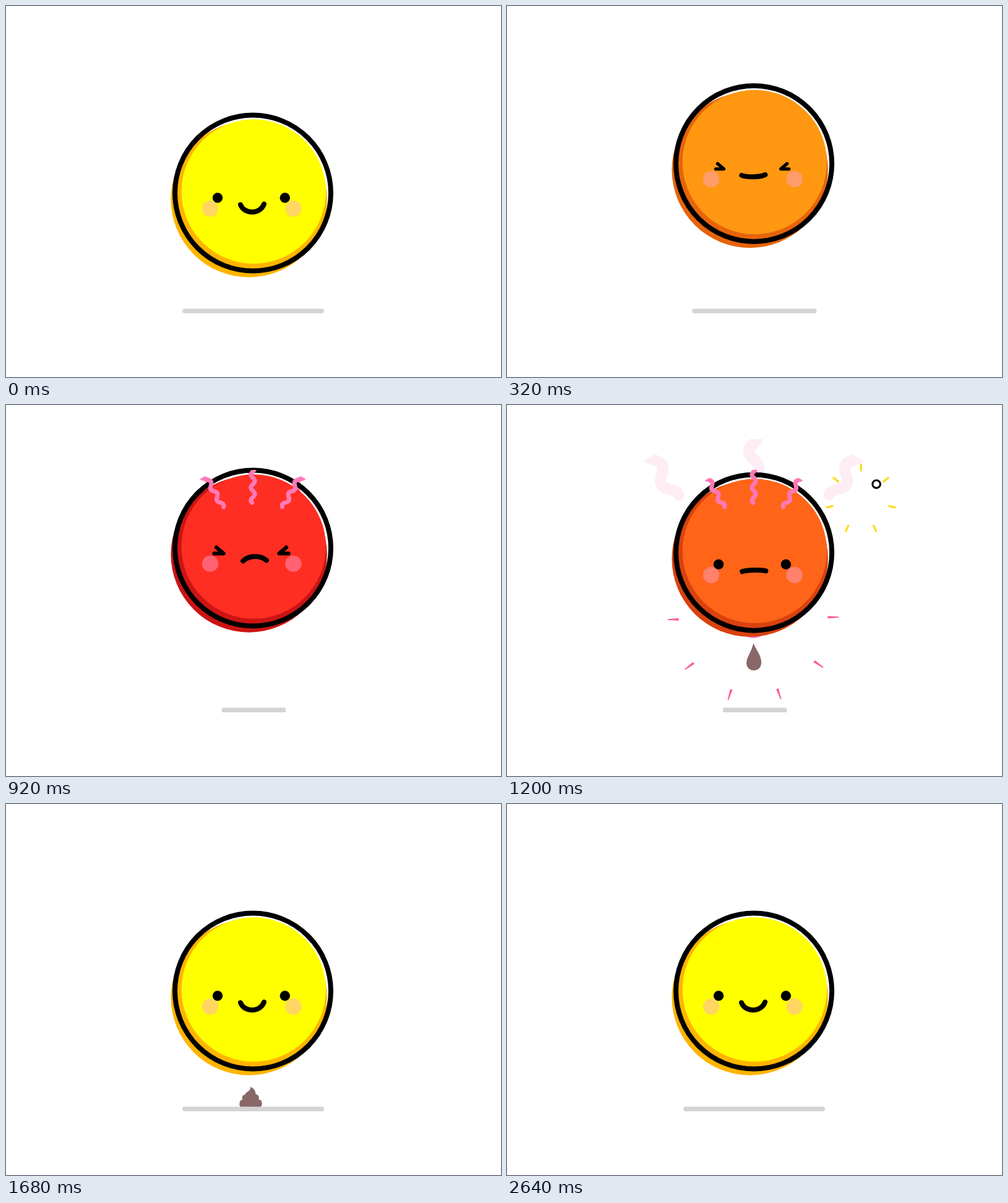
An HTML page with a canvas for the animation above (3840 ms loop, 800x600 px).

```html
<!DOCTYPE html>
<html lang="en">
<head>
<meta charset="utf-8">
<title>Hot ball</title>
<style>
html, body { margin: 0; width: 100%; height: 100%; overflow: hidden; background: #fff; }
canvas { display: block; width: 100vw; height: 100vh; }
</style>
</head>
<body>
<canvas width="800" height="600"></canvas>
<script>
const ctx = document.querySelector('canvas').getContext('2d');
const LOOP = 3840, STEP = 40, TAU = Math.PI * 2;
const PINK = '#ff78b4', BROWN = '#886868';
const YELLOW = [255, 255, 0], AMBER = [255, 180, 0], RED = [255, 46, 34], CRIMSON = [204, 20, 20];

const lerp = (a, b, p) => a + (b - a) * p;
const mix = (a, b, p) => a.map((v, i) => lerp(v, b[i], p));
const rgb = c => `rgb(${c.map(Math.round)})`;
const ramp = (t, a, b) => Math.min(1, Math.max(0, (t - a) / (b - a)));
const smooth = (t, a, b) => { const p = ramp(t, a, b); return p * p * (3 - 2 * p); };
const easeOut = (t, a, b, power = 3) => 1 - (1 - ramp(t, a, b)) ** power;

function disc(x, y, r, color) {
  ctx.fillStyle = color;
  ctx.beginPath();
  ctx.arc(x, y, r, 0, TAU);
  ctx.fill();
}

function ring(x, y, r, width) {
  ctx.beginPath();
  ctx.arc(x, y, r, 0, TAU);
  stroke('#000', width);
}

function stroke(color, width) {
  ctx.strokeStyle = color;
  ctx.lineWidth = width;
  ctx.stroke();
}

function scoped(draw) {
  ctx.save();
  draw();
  ctx.restore();
}

function rays(x, y, count, start, inner, outer, color, width) {
  ctx.lineCap = 'butt';
  ctx.beginPath();
  for (let i = 0; i < count; i++) {
    const a = start + i * TAU / count, c = Math.cos(a), s = Math.sin(a);
    ctx.moveTo(x + c * inner, y + s * inner);
    ctx.lineTo(x + c * outer, y + s * outer);
  }
  stroke(color, width);
}

// Three wavy lines with flat tips; spread moves them outwards, enlarges and fades them.
// Each shows the part between two distances below its tip.
function steam(spread, from, to) {
  if (from >= to) return;
  for (const side of [-1, 0, 1]) scoped(() => {
    const bow = 14 * Math.abs(side), scale = 1 + 1.6 * spread;
    ctx.globalAlpha = 1 - 0.87 * spread;
    ctx.translate(399 + side * (74 + 91 * spread), 105 + bow + (bow - 50) * spread);
    ctx.rotate(0.5 * side);
    ctx.scale(side < 0 ? -scale : scale, scale);
    ctx.beginPath();
    ctx.rect(-20, 0, 40, 80);
    ctx.clip();
    ctx.lineCap = ctx.lineJoin = 'round';
    ctx.beginPath();
    for (let d = from; d <= to; d++) ctx.lineTo(-3.2 * Math.sin(TAU * (d - 2.5) / 20.8), d);
    stroke(PINK, 7);
  });
}

function word(t) {
  if (t <= 1200 || t >= 1600) return;
  const baseline = lerp(330, 137, easeOut(t, 1200, 1600, 2));
  const centers = [264, 385.5, 516, 591];
  scoped(() => {
    ctx.globalAlpha = 1 - ramp(t, 1350, 1600);
    ctx.font = '700 163px Lato, sans-serif';
    ctx.lineJoin = 'round';
    ctx.lineWidth = 9;
    ctx.fillStyle = ctx.strokeStyle = PINK;
    [...'POP!'].forEach((letter, i) => {
      const m = ctx.measureText(letter);
      const x = centers[i] - (m.actualBoundingBoxRight - m.actualBoundingBoxLeft) / 2;
      ctx.strokeText(letter, x, baseline);
      ctx.fillText(letter, x, baseline);
    });
  });
}

function burst(t) {
  if (t < 1120 || t >= 1360) return;
  const p = easeOut(t, 1120, 1360);
  const inner = lerp(50, 150, p), outer = lerp(110, 150, p);
  ctx.fillStyle = '#ff5c94';
  for (let i = 0; i < 10; i++) scoped(() => {
    ctx.translate(398, 345);
    ctx.rotate(-0.015 + i * TAU / 10);
    ctx.beginPath();
    ctx.moveTo(inner, -2);
    ctx.lineTo(outer, -0.8);
    ctx.lineTo(outer, 0.8);
    ctx.lineTo(inner, 2);
    ctx.fill();
  });
  if (t < 1280) disc(398, 349, 28, PINK);
}

function fireworks(t) {
  if (t >= 1040 && t < 1480) {
    rays(572, 153, 7, -TAU / 4, 65 * easeOut(t, 1080, 1440), 69 * easeOut(t, 1000, 1440), '#ffd800', 3);
  }
  if (t > 1160 && t < 1520) {
    ring(597, 128, 30 * easeOut(t, 1160, 1520, 2), 3.1 * (1 - ramp(t, 1160, 1520) ** 2));
  }
  if (t >= 1320 && t < 1560) {
    const p = easeOut(t, 1320, 1560);
    rays(242, 103, 20, 0, 44 * p, lerp(20, 45, p), '#5088e0', 1.2);
  }
}

function dropping(t) {
  if (t < 1120 || t >= 2640) return;
  scoped(() => {
    ctx.fillStyle = BROWN;
    if (t < 1280) {
      const p = ramp(t, 1120, 1280);
      ctx.translate(398, lerp(347, 446, 0.55 * p + 0.45 * p * p));
      ctx.fill(new Path2D('M0 0C5 11 13 20 13 31C13 39 8 44 1 44C-6 44 -11 39 -11 32C-11 22 -2 13 0 0Z'));
    } else {
      ctx.globalAlpha = 1 - ramp(t, 2440, 2640);
      ctx.translate(395.5, 490);
      ctx.scale(lerp(0.6, 1, easeOut(t, 1280, 1520, 2)), 1);
      ctx.fill(new Path2D('M0 -33C4 -30 8 -27 8 -21C12 -20 14 -17 13 -12C17 -12 19 -8 18 -4Q18 -2 16 0'
        + 'H-16Q-19 -2 -18 -6C-18 -9 -16 -12 -13 -12C-15 -16 -13 -20 -9 -20C-8 -25 0 -25 0 -33Z'));
    }
  });
}

function shadow(t) {
  const p = smooth(t, 180, 640) - smooth(t, 1200, 1660);
  const width = lerp(229, 103, p);
  ctx.fillStyle = '#d4d4d4';
  ctx.beginPath();
  ctx.roundRect(399.5 - width / 2 + p, 489.5, width, 7.5, lerp(3.7, 1.5, p));
  ctx.fill();
}

function ball(t, y, heat) {
  const glow = smooth(t, 1100, 1400) - smooth(t, 1400, 1660);
  const rim = mix(AMBER, YELLOW, 0.8 * glow);
  disc(392.6, y + 10, 126.2, rgb(mix(rim, CRIMSON, heat)));
  disc(400.3, y - 2.5, 116.7, rgb(mix(YELLOW, RED, heat)));
  ring(399, y, 126, 8);
}

function face(t, y, heat) {
  for (const x of [330, 464.5]) disc(x, y + 17.3, 13.2, 'rgba(255,165,215,.45)');
  ctx.lineCap = ctx.lineJoin = 'round';
  const squinting = t >= 200 && t < 1140;
  for (const side of [-1, 1]) {
    if (!squinting) {
      disc(396.4 + side * 54.4, y, 8.2, '#000');
      continue;
    }
    scoped(() => {
      const size = 0.74 + 0.26 * heat;
      ctx.translate(396.5 + side * 53, y + 0.6);
      ctx.scale(side * size, size);
      ctx.beginPath();
      ctx.moveTo(3.5, -9.5);
      ctx.lineTo(-8, 0.3);
      ctx.lineTo(7, 0.3);
      stroke('#000', 6.2);
    });
  }
  const bend = lerp(16.5, -9, heat), inset = lerp(6, 10, heat);
  const left = 379 + 4 * heat ** 4, right = left + 38, end = y + 10.5 + 2 * heat ** 4;
  ctx.beginPath();
  ctx.moveTo(left, end + 0.5);
  ctx.bezierCurveTo(left + inset, end + bend, right - inset, end + bend, right, end - 0.5);
  stroke('#000', 8);
}

function draw(t) {
  ctx.clearRect(0, 0, 800, 600);
  const rise = smooth(t, 0, 520);
  const bodyY = 302.5 - 71 * (rise - smooth(t, 1094, 1633));
  const faceY = 310.3 - 71 * (rise - smooth(t, 1105, 1390));
  const heat = smooth(t, 0, 640) - smooth(t, 1100, 1400);
  word(t);
  if (t >= 900 && t < 1240) {
    const spread = (t - 900) / 300;
    steam(spread, 0, lerp(53, 29, spread));
  }
  burst(t);
  dropping(t);
  shadow(t);
  ball(t, bodyY, heat);
  face(t, faceY, heat);
  steam(0, lerp(53, 0, ramp(t, 600, 900)), lerp(53, 0, ramp(t, 1200, 1320)));
  fireworks(t);
}

const begin = performance.now();
function tick() {
  const t = (performance.now() - begin) % LOOP;
  draw(Math.floor(t / STEP) * STEP);
  requestAnimationFrame(tick);
}
tick();
</script>
</body>
</html>
```
